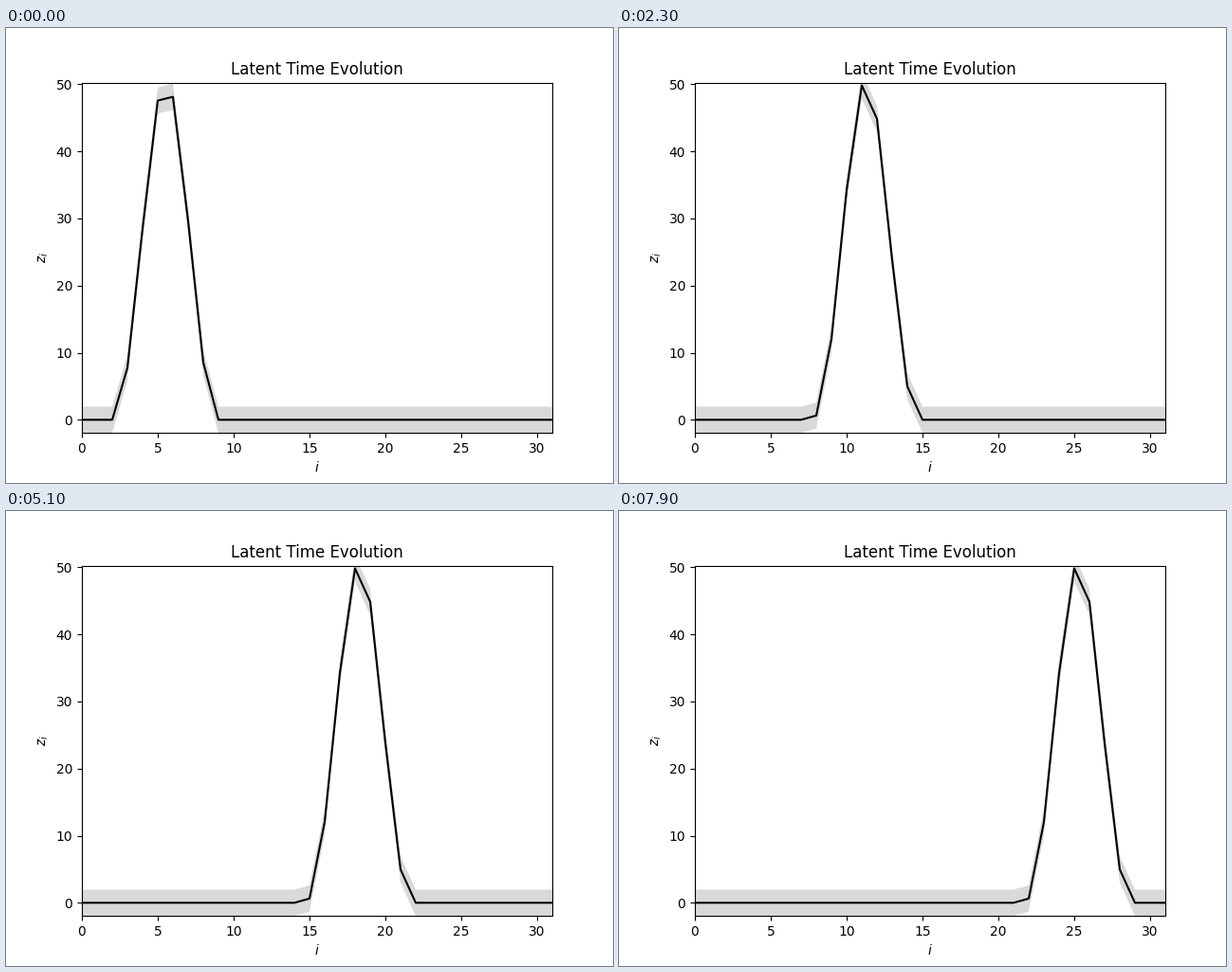
These frames come from a looping animation (640 px wide and 480 px high, 8000 ms). A matplotlib script:

```python
import numpy as np
import matplotlib.pyplot as plt
from matplotlib.animation import FuncAnimation

FRAMES, INTERVAL = 80, 100
START, SPEED = 5.525, 0.25      # pulse centre and its step per frame
PEAK, HALF_WIDTH, POWER = 50.7, 3.7, 2.55
CUTOFF = 3.45                   # the pulse is zero beyond this distance
BAND = 1.96

nodes = np.arange(32)


def pulse(frame):
    dist = np.abs(nodes - START - SPEED * frame)
    inside = np.minimum(dist, CUTOFF)
    height = PEAK * np.cos(np.pi * inside / (2 * HALF_WIDTH)) ** POWER
    return np.where(dist < CUTOFF, height, 0.0)


def band_outline(z):
    upper = np.column_stack([nodes, z + BAND])
    lower = np.column_stack([nodes, z - BAND])
    return np.vstack([upper, lower[::-1]])


fig, ax = plt.subplots(figsize=(6.4, 4.8), dpi=100)
ax.set_title("Latent Time Evolution")
ax.set_xlabel("$i$")
ax.set_ylabel("$z_i$")

z0 = pulse(0)
band = ax.fill_between(nodes, z0 - BAND, z0 + BAND,
                       facecolor="black", alpha=0.15, linewidth=0)
line, = ax.plot(nodes, z0, color="black", linewidth=1.5)
ax.set_xlim(0, 31)
ax.set_ylim(-BAND, 50.24)


def update(frame):
    z = pulse(frame)
    line.set_ydata(z)
    band.set_verts([band_outline(z)])
    return line, band


anim = FuncAnimation(fig, update, frames=FRAMES, interval=INTERVAL,
                     repeat=True, repeat_delay=0, blit=False)
plt.show()
```
